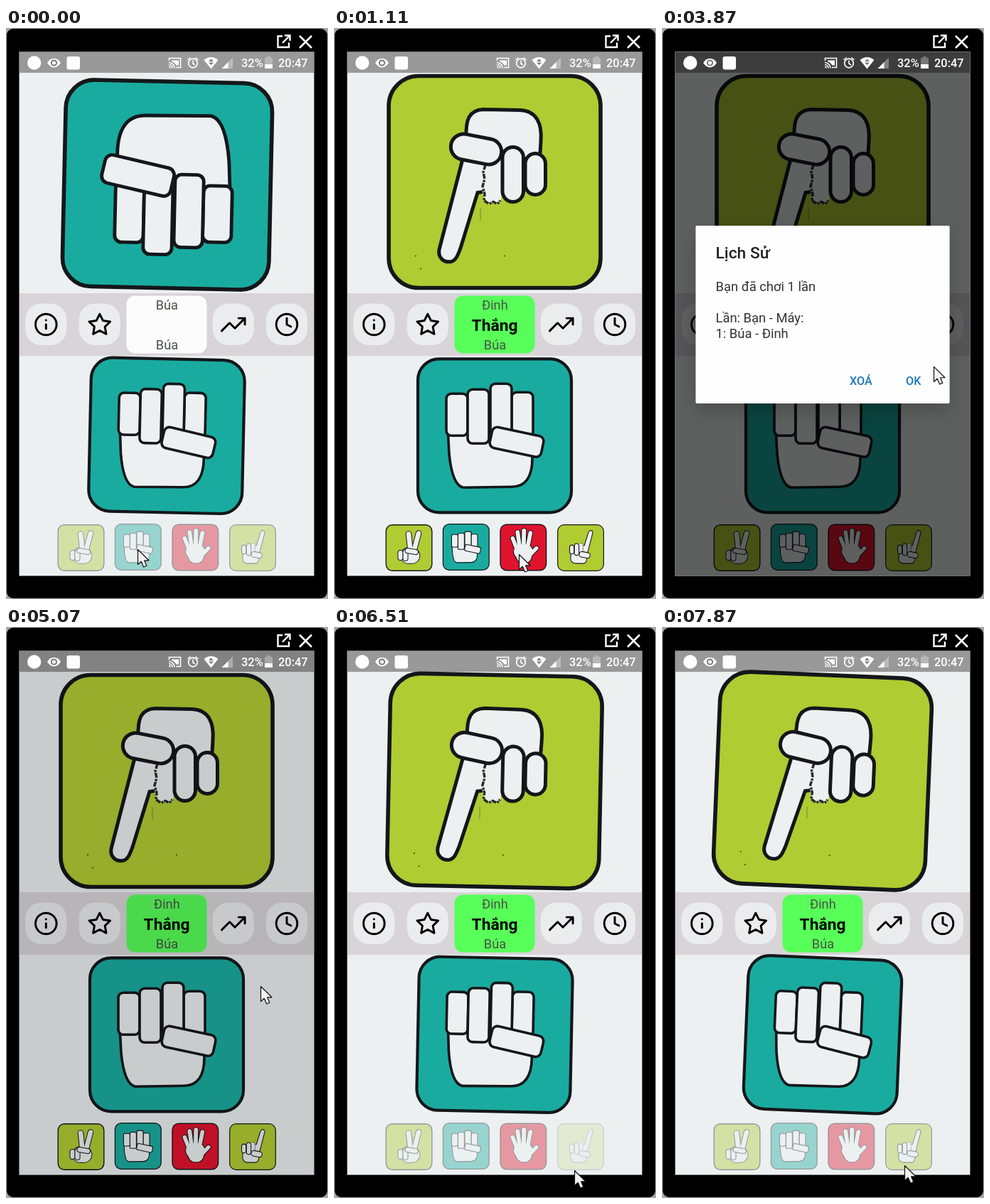
Animation, 453 px wide and 803 px high, one loop 7990 ms. Source, as an HTML page with a canvas:

```html
<!DOCTYPE html>
<html lang="vi">
<head>
<meta charset="utf-8">
<title>Hand game</title>
<style>
html, body { margin: 0; width: 100%; height: 100%; overflow: hidden; background: #000; }
canvas { display: block; width: 453px; height: 803px; }
</style>
</head>
<body>
<canvas id="stage"></canvas>
<script>
const W = 453, H = 803, LOOP = 7990, TAU = Math.PI * 2;
const PAPER = '#ecf0f1', INK = '#14171a', BAR = '#d8d4d8';
const GREEN = '#b1cb32', TEAL = '#1aaba0', RED = '#e0132d';
const canvas = document.getElementById('stage');
const dpr = window.devicePixelRatio || 1;
canvas.width = W * dpr;
canvas.height = H * dpr;
const c = canvas.getContext('2d');

const BURSTS = [[0, 0, 1], [140, 1110, 8], [1240, 2170, 8], [2470, 2470, 1],
  [2770, 3010, 3], [3320, 3320, 1], [3590, 4270, 6], [4800, 4800, 1],
  [5070, 5810, 6], [6240, 6240, 1], [6510, 7450, 8], [7590, 7870, 3]];
const TICKS = BURSTS.flatMap(([a, b, n]) =>
  Array.from({ length: n }, (_, i) => n > 1 ? Math.round(a + (b - a) * i / (n - 1)) : a));

// Pointer keys: [time, x, y]
const POINTER = [[0, 185, 733], [971, 260, 740], [1110, 260, 740], [2170, 400, 422],
  [2470, 399, 421], [3450, 399, 421], [3870, 382, 476], [4270, 358, 505],
  [5070, 358, 505], [5810, 338, 764], [6510, 338, 764], [7870, 341, 757]];

function pointerAt(t) {
  const i = POINTER.findIndex(k => k[0] > t);
  if (i < 0) return POINTER[POINTER.length - 1].slice(1);
  const [t0, x0, y0] = POINTER[i - 1], [t1, x1, y1] = POINTER[i];
  const p = (t - t0) / (t1 - t0), e = p * p * (3 - 2 * p);
  return [x0 + (x1 - x0) * e, y0 + (y1 - y0) * e];
}

function wobble(t) {
  const start = t < 1110 ? -13 : t >= 6510 ? 6498 : null;
  return start === null ? 0 : 7 * Math.sin(TAU * (t - start) / 449);
}

function at(x, y, scale, deg, draw) {
  c.save();
  c.translate(x, y);
  c.rotate(deg * Math.PI / 180);
  c.scale(scale, scale);
  draw();
  c.restore();
}

function box(x, y, w, h, r, fill, stroke, width) {
  c.beginPath();
  c.roundRect(x, y, w, h, r);
  if (fill) { c.fillStyle = fill; c.fill(); }
  if (stroke) { c.strokeStyle = stroke; c.lineWidth = width; c.stroke(); }
}

function shape(d, fill, stroke, width) {
  const p = new Path2D(d);
  if (fill) { c.fillStyle = fill; c.fill(p); }
  if (stroke) { c.strokeStyle = stroke; c.lineWidth = width; c.stroke(p); }
}

function disc(x, y, r, fill, stroke, width) {
  c.beginPath();
  c.arc(x, y, r, 0, TAU);
  if (fill) { c.fillStyle = fill; c.fill(); }
  if (stroke) { c.strokeStyle = stroke; c.lineWidth = width; c.stroke(); }
}

function text(s, x, y, size, weight, color, align = 'left') {
  c.font = `${weight} ${size}px Roboto, sans-serif`;
  c.textAlign = align;
  c.fillStyle = color;
  c.fillText(s, x, y);
}

// Hands, each around its own card centre

function rock() {
  box(-108, -108, 216, 216, 30, TEAL, INK, 4.2);
  shape('M-66-12L-64 26C-61 56-54 71-44 73L24 72C44 72 53 57 53 32L53-12Z', PAPER, INK, 3.6);
  const fingers = [[-68, -59, 0], [24, -61, 2], [-38, -65, 11], [-6, -73, 4]];
  for (const [x, top, end] of fingers) box(x, top, 30, end - top, 7, PAPER, INK, 3.6);
  at(31, 9, 1, 12, () => box(-37, -15, 74, 30, 7.5, PAPER, INK, 3.6));
}

// Points downwards
function nail() {
  box(-149, -149, 298, 298, 42, GREEN, INK, 5.6);
  shape('M-40-62C-41-88-36-101-16-102L36-101C59-100 67-82 65-57L63-38L12 10L8 29' +
    'C-4 33-16 28-17 14L-24 15L-48 93C-52 103-54 110-61 112C-72 114-80 106-78 95L-43-40Z', PAPER);
  shape('M-40-62C-41-88-36-101-16-102L36-101C59-100 67-82 65-57L64-40' +
    'M-43-40L-78 95C-80 106-72 114-61 112C-54 110-52 103-48 93L-24 15L-17 14', null, INK, 5);
  c.save();
  c.setLineDash([7, 2, 3, 1]);
  shape('M-13-24L-16-14L-14-4L-17 6L-14 17L-15 26L-8 31L-2 28L4 31L8 26', null, '#2b2e26', 3.5);
  c.restore();
  shape('M-20 37V54', null, '#8d9b3c', 1.5);
  for (const [x, y] of [[-111, 104], [-104, 122], [14, 104]]) disc(x, y, 1.1, '#46501c');
  box(11, -49, 29.5, 77, 14.7, PAPER, INK, 5);
  box(43, -40, 28.5, 58, 14.2, PAPER, INK, 5);
  at(-26, -46, 1, 11, () => box(-36, -18, 72, 36, 18, PAPER, INK, 5));
}

// Joins rounded limbs [x0, y0, x1, y1, width] into one outlined form
function limbs(list) {
  c.lineCap = 'round';
  for (const [color, extra] of [[INK, 0.6], [PAPER, -1.4]]) {
    for (const [x0, y0, x1, y1, w] of list) {
      c.beginPath();
      c.moveTo(x0, y0);
      c.lineTo(x1, y1);
      c.strokeStyle = color;
      c.lineWidth = w + extra;
      c.stroke();
    }
  }
  c.lineCap = 'butt';
}

function scissors() {
  box(-32.3, -32.3, 64.6, 64.6, 9, GREEN, INK, 1.4);
  limbs([[-0.5, -19.5, 2, 4, 8], [13.5, -20.5, 7, 4, 8], [-1, 11, 4, 11, 23]]);
  limbs([[-12, 7, -12, 14, 7.5]]);
  limbs([[-5, 6, -5, 15, 7.5]]);
  limbs([[-2, 4, 9.5, 6, 7.5]]);
}

function paper() {
  box(-32.3, -32.3, 64.6, 64.6, 9, RED, INK, 1.4);
  limbs([[-15, -13, -8, 5, 6.8], [-8, -21.5, -5, 0, 7], [1, -23.5, 0.5, 0, 7.2],
    [10, -20.5, 6, 0, 7], [18.5, 1, 9, 11, 6.8], [-3, 6, 3, 6, 22], [0, 12, 2, 12, 21]]);
}

function choices(t) {
  const busy = t < 1110 || t >= 6510;
  const items = [[105.5, 731, 1, 0, scissors], [185.8, 730, 0.3, 0, rock],
    [266.3, 730.5, 1, 0, paper], [347, 731, 0.217, 180, nail]];
  items.forEach(([x, y, s, deg, draw], i) => {
    at(x, y, s, deg, draw);
    const pressed = i === 3 && t >= 6240 && t < 6640;
    const alpha = pressed ? 0.16 : busy ? 0.4 : 1;
    if (alpha < 1) {
      c.globalAlpha = 1 - alpha;
      box(x - 34, y - 34, 68, 68, 0, PAPER);
      c.globalAlpha = 1;
    }
  });
}

const ICONS = [
  [56.3, 'M22 12A10 10 0 1 1 2 12A10 10 0 1 1 22 12ZM12 16V12M12 8V8.01'],
  [131.8, 'M12 2L15.09 8.26L22 9.27L17 14.14L18.18 21.02L12 17.77L5.82 21.02L7 14.14L2 9.27L8.91 8.26Z'],
  [319.8, 'M23 6L13.5 15.5L8.5 10.5L1 18M17 6H23V12'],
  [395, 'M22 12A10 10 0 1 1 2 12A10 10 0 1 1 22 12ZM12 6V12L16 14']
];

function middleBar(t) {
  box(19, 373, 415, 88, 0, BAR);
  c.lineCap = c.lineJoin = 'round';
  for (const [x, d] of ICONS) {
    box(x - 29, 387.5, 58, 58.5, 22, '#ebecee');
    at(x, 417, 1.48, 0, () => { c.translate(-12, -12); shape(d, null, '#000', 2); });
  }
  c.lineCap = 'butt';
  c.lineJoin = 'miter';
  if (t >= 2770 && t < 3320) {
    c.globalAlpha = 0.6;
    box(365, 386, 60, 61, 22, '#e2e1e4');
    c.globalAlpha = 1;
  }
  const done = t >= 1110;
  box(169.5, 376.5, 113, 81, 12, done ? '#57ff58' : '#fcfcfc');
  text(done ? 'Đinh' : 'Búa', 226.3, 396, 18.2, 400, '#4c504c', 'center');
  if (done) text('Thắng', 226, 426, 22.8, 700, '#000', 'center');
  text('Búa', 226.5, 452, 18.2, 400, '#4c504c', 'center');
}

function dialog(alpha) {
  c.save();
  c.globalAlpha = alpha;
  c.save();
  c.beginPath();
  c.rect(19, 35, 415, 735);
  c.rect(47.5, 278, 357, 250);
  c.clip('evenodd');
  c.shadowColor = 'rgba(0,0,0,.2)';
  c.shadowBlur = 26 * dpr;
  c.shadowOffsetY = 10 * dpr;
  box(47.5, 278, 357, 250, 2, '#fff');
  c.restore();
  box(47.5, 278, 357, 250, 2, '#fefefe');
  text('Lịch Sử', 75.5, 323.5, 22.8, 500, '#222');
  text('Bạn đã chơi 1 lần', 75.5, 370, 18.4, 400, '#333');
  text('Lần: Bạn - Máy:', 75.5, 414, 18.4, 400, '#333');
  text('1: Búa - Đinh', 75.5, 435.5, 18.4, 400, '#333');
  text('XOÁ', 264, 502, 16.2, 500, '#1c76ba');
  text('OK', 343, 502, 16.2, 500, '#1c76ba');
  c.restore();
}

function statusIcons() {
  const w = '#fff';
  disc(39.7, 49, 9.7, w);
  shape('M58 49C63 40.5 72 40.5 77 49C72 57.5 63 57.5 58 49Z', w);
  disc(67.5, 49, 4.6, '#777');
  disc(67.5, 49, 2.6, w);
  box(85.5, 40, 18.5, 18.5, 3, w);
  // cast
  shape('M229.5 46V42.5H245.5V55.5H239M229 54.5A2 2 0 0 1 231 56.5M229 51.5A5 5 0 0 1 234 56.5M229 48.5A8 8 0 0 1 237 56.5', null, w, 1.6);
  shape('M233 45.5H243V52.5H239.5Q237 48 233 47Z', w);
  // alarm
  disc(263, 49.5, 6.3, null, w, 1.7);
  shape('M263 45.5V50L266 52M255.5 45L259.5 41.5M270.5 45L266.5 41.5', null, w, 1.6);
  // wireless and signal
  shape('M278.5 45Q288.5 37 298.5 45L288.5 57.5Z', w);
  shape('M288.5 43.5L292 47H285ZM285 48.5H292L288.5 52Z', '#777');
  shape('M303.5 57H319V41.5Z', 'rgba(255,255,255,.35)');
  shape('M303.5 57H312.5V48Z', w);
  text('32%', 331, 55, 16.4, 500, w);
  // battery
  shape('M364 42H367V40H372V42H375V57H364Z', 'rgba(255,255,255,.3)');
  box(364, 51, 11, 6, 0, w);
  text('20:47', 383, 55, 16.4, 500, w);
}

function frame() {
  box(0, 0, W, H, 0, '#a8a8a8');
  box(1, 1, 451, 801, 9, '#000');
  box(18.5, 33.5, 415, 737, 0, PAPER, '#6f6f6f', 1);
  shape('M389 11.5H382.5V27H398V20.5M392 10.5H399.5V18M399.5 10.5L389 21', null, '#fff', 2.4);
  shape('M413 11L430 28M430 11L413 28', null, '#fff', 2.6);
}

function tapMark() {
  c.save();
  c.shadowColor = 'rgba(0,0,0,.45)';
  c.shadowBlur = 5 * dpr;
  c.shadowOffsetX = c.shadowOffsetY = 2 * dpr;
  shape('M399 424Q403 420 406 425L408 441Q412 438 415 442Q419 440 421 444Q426 443 426 449' +
    'L425 461Q424 467 421 469V475H399V470Q394 464 390 455Q389 448 395 449L400 453Z', '#0a66c8', '#fff', 1);
  c.restore();
}

function pointer(x, y) {
  at(x, y, 1, 0, () => {
    c.lineJoin = 'round';
    shape('M.5.5V21.5L5.3 17.3L8.6 25L12.8 23.2L9.6 15.8H16Z', '#f4f4f4', '#111', 1.2);
    c.lineJoin = 'miter';
  });
}

function render(ms) {
  const t = TICKS.reduce((a, b) => b <= ms ? b : a, 0);
  c.setTransform(dpr, 0, 0, dpr, 0, 0);
  frame();

  c.save();
  c.beginPath();
  c.rect(19, 34, 414, 736);
  c.clip();
  box(19, 34, 415, 29, 0, '#999');
  const angle = wobble(t);
  if (t < 1110) at(227, 220.5, 1.345, 180 + angle, rock);
  else at(226, 216.5, 1, angle, nail);
  middleBar(t);
  at(226, 573.3, 1, angle, rock);
  choices(t);

  const open = t >= 2770 && t < 5070;
  const fade = !open ? 0 : t < 2890 ? 0.2 : t < 3010 ? 0.55 : 1;
  const dim = fade === 1 ? 0.6 : t >= 5070 && t < 5200 ? 0.15 : 0;
  if (dim) box(19, 34, 415, 737, 0, `rgba(0,0,0,${dim})`);
  statusIcons();
  if (open) dialog(fade);
  c.restore();

  if (t >= 2770 && t < 3320) tapMark();
  pointer(...pointerAt(t));
}

function loop(now) {
  render(now % LOOP);
  requestAnimationFrame(loop);
}
requestAnimationFrame(loop);
</script>
</body>
</html>
```
